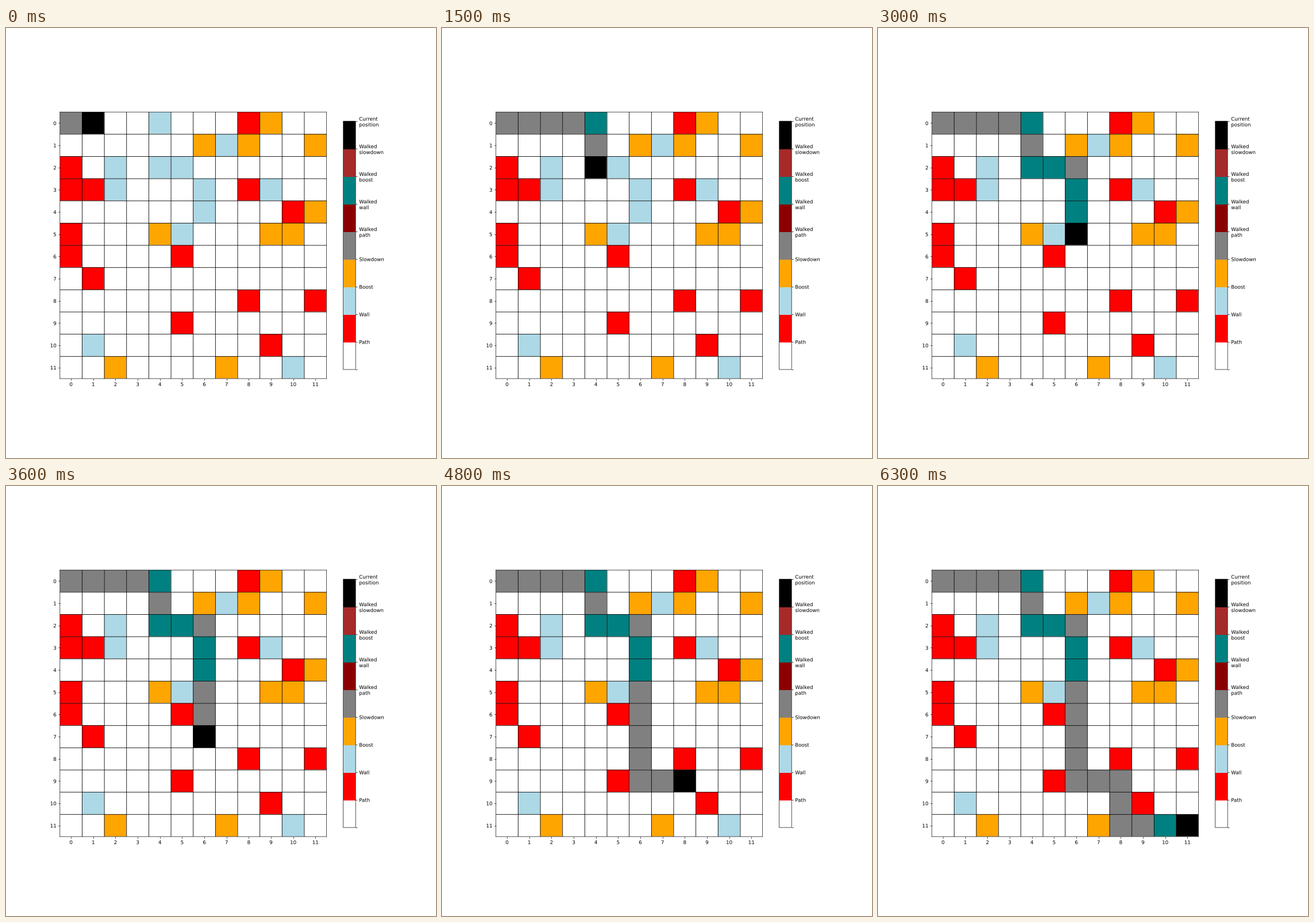
Animation of 748 by 748 pixels, one loop 6.6 s. Source, as a matplotlib script:

```python
import numpy as np
import matplotlib.pyplot as plt
from matplotlib.animation import FuncAnimation
from matplotlib.colors import ListedColormap
from matplotlib.patheffects import Normal
from matplotlib.text import Text

STAGE = 748
INCHES = 12
INTERVAL = 300

# Cell kinds: "." path, "#" wall, "+" boost, "-" slowdown
KINDS = ".#+-"
MAZE = """
....+...#-..
......-+-..-
#.+.++......
##+...+.#+..
......+...#-
#...-+...--.
#....#......
.#..........
........#..#
.....#......
.+.......#..
..-....-..+.
""".split()
MOVES = "RRRR" "DD" "RR" "DDDDDDD" "RR" "DD" "RRR"
WALKED = len(KINDS)
CURRENT = 2 * WALKED

COLORS = ["white", "red", "lightblue", "orange", "gray",
          "darkred", "teal", "brown", "black"]
LABELS = ["", "Path", "Wall", "Boost", "Slowdown", "Walked\npath",
          "Walked\nwall", "Walked\nboost", "Walked\nslowdown",
          "Current\nposition"]

maze = np.array([[KINDS.index(c) for c in row] for row in MAZE])
size = len(maze)

route = [(0, 0)]
for move in MOVES:
    row, col = route[-1]
    route.append((row + (move == "D"), col + (move == "R")))


def state(step):
    """Maze values after the given number of moves, centred in colour bins."""
    cells = maze.copy()
    for cell in route[:step]:
        cells[cell] += WALKED
    cells[route[step]] = CURRENT
    return cells + 0.5


# Unsnapped lines and unhinted text keep their sub-pixel positions.
plt.rcParams.update({"font.family": "DejaVu Sans", "path.snap": False,
                     "text.hinting": "none"})
fig, ax = plt.subplots(figsize=(INCHES, INCHES), dpi=STAGE / INCHES)

# Lines sit a little right of and below the edges of the cells.
nudge = 0.5 / 1200
fig.subplots_adjust(left=0.125 + nudge, right=0.9 + nudge,
                    bottom=0.11 - nudge, top=0.88 - nudge)
edges = np.arange(size + 1) - 0.5 - 0.5 / 62
mesh = ax.pcolormesh(edges, edges, state(1), cmap=ListedColormap(COLORS),
                     vmin=0, vmax=len(COLORS), antialiased=True, linewidth=0)
ax.set(xlim=(-0.5, size - 0.5), ylim=(size - 0.5, -0.5), aspect="equal")

for axis in (ax.xaxis, ax.yaxis):
    axis.set_ticks(range(size))
    axis.set_ticks(np.arange(0.5, size - 1), minor=True)
ax.tick_params(which="minor", length=0)
ax.grid(which="minor", color="black", linewidth=1)

bar = fig.colorbar(mesh, ax=ax, shrink=0.75, ticks=range(len(LABELS)))
bar.ax.set_yticklabels(LABELS)
for label in fig.findobj(Text):
    label.set_path_effects([Normal()])


def update(frame):
    mesh.set_array(state(frame + 1))
    return [mesh]


anim = FuncAnimation(fig, update, frames=len(MOVES), interval=INTERVAL,
                     repeat=True, repeat_delay=0)
plt.show()
```
